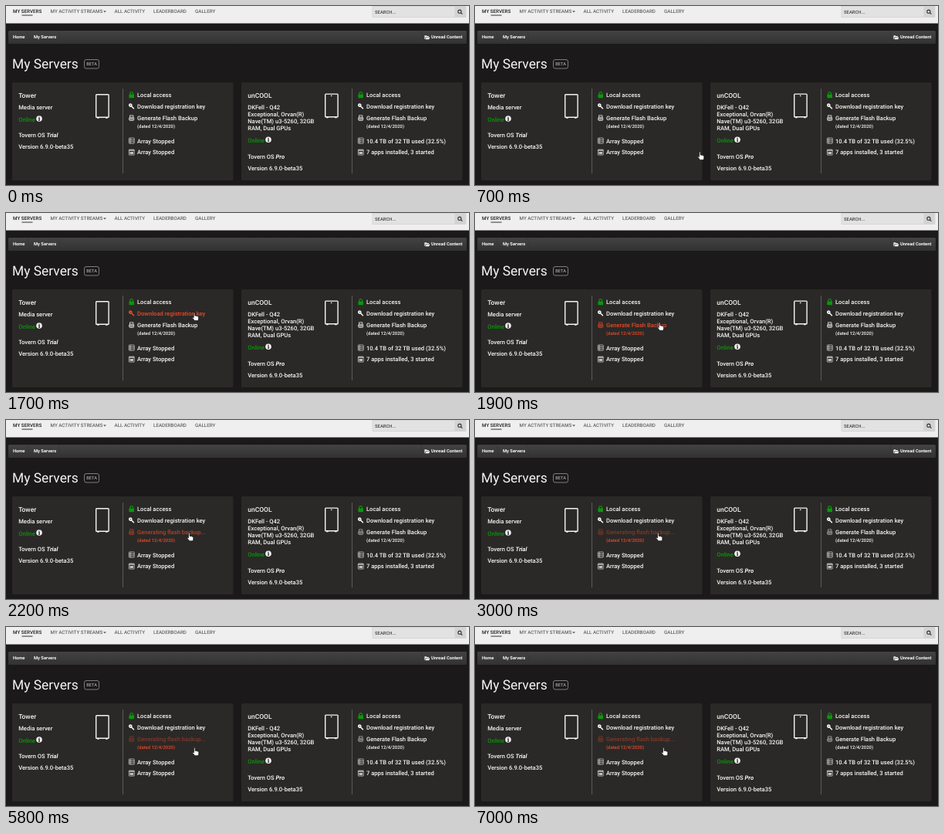
Animation of 600 by 232 pixels, one loop 8 s. Source, as an HTML page:

```html
<!DOCTYPE html>
<html lang="en">
<head>
<meta charset="utf-8">
<title>My Servers</title>
<style>
  html, body { margin: 0; width: 100%; height: 100%; overflow: hidden; background: #1b191a; }
  svg { display: block; width: 600px; height: 232px; }
  text { font-family: Roboto, "Open Sans", sans-serif; font-size: 7.6px; font-weight: 500; fill: #f6f6f6; text-rendering: geometricPrecision; white-space: pre; }
  .nav { font-size: 6.25px; fill: #626262; }
  .nav.on { fill: #1c1c1c; }
  .nav.find { fill: #444; font-size: 5.9px; }
  .crumb { font-size: 5.75px; font-weight: 700; }
  .title { font-size: 17.4px; font-weight: 400; }
  .beta { font-size: 5.7px; fill: #c4c4c4; font-weight: 400; }
  .name { font-size: 8.5px; }
  .small { font-size: 5.95px; }
  .online { fill: #0b960b; }
  .em { font-weight: 700; font-style: italic; }
</style>
</head>
<body>
<svg viewBox="0 0 600 232">
  <defs>
    <linearGradient id="bar" x2="0" y2="1">
      <stop offset="0" stop-color="#434343"/><stop offset="1" stop-color="#323232"/>
    </linearGradient>
    <g id="lock">
      <path d="M-1.9 0V-1.6a1.9 1.9 0 0 1 3.8 0V0" fill="none" stroke="#0b960b" stroke-width="1.2"/>
      <rect x="-3.3" y="-.6" width="6.6" height="4.6" rx=".6" fill="#0b960b"/>
    </g>
    <g id="key" fill="none" stroke="currentColor">
      <circle cx="-1.4" cy="-1.4" r="1.5" stroke-width="1.7"/>
      <path d="M-.3-.3 3.2 3.2M1.4 2.2 2.4 1.2" stroke-width="1.4"/>
    </g>
    <g id="flash" fill="none" stroke="currentColor" stroke-width=".9" opacity=".85">
      <path d="M-2.2-.6V-3.2H2.2V-.6"/>
      <rect x="-3" y="-.8" width="6" height="4.2" rx="1" fill="currentColor" fill-opacity=".35"/>
      <path d="M-3 1.1H3"/>
    </g>
    <g id="disks" fill="none" stroke="#c9c9c9" stroke-width=".8">
      <rect x="-3.3" y="-3.4" width="6.8" height="7" rx=".4"/>
      <path d="M-3.3-1H3.5M-3.3 1.3H3.5M-1.4-3.4V3.6"/>
    </g>
    <g id="apps" fill="none" stroke="#c9c9c9" stroke-width=".8">
      <rect x="-3.3" y="-3.4" width="6.8" height="7" rx=".4"/>
      <path d="M-3.3-2.4H3.5" stroke-width="1.4"/>
      <rect x="-1.8" y="0" width="3.8" height="2" fill="#c9c9c9"/>
    </g>
    <g id="info">
      <circle r="3.8" fill="#f4f4f4"/>
      <path d="M0-2.4V-1.2M-.9-.4H.2V2M-1 2.1H1.1" stroke="#2a2927" stroke-width="1.1" fill="none"/>
    </g>
    <g id="tower" fill="none" stroke="#f4f4f4" stroke-width="1.4">
      <rect x=".7" y=".7" width="16.4" height="29.6" rx=".8"/>
      <path d="M2.2 31.2H4.6M13.200 31.2H15.600" stroke-width="1.2"/>
    </g>
  </defs>

  <rect width="600" height="232" fill="#1b191a"/>
  <rect width="600" height="22.5" fill="#f0efef"/>
  <rect x="20.5" y="11.5" width="14" height="1" fill="#333"/>
  <path d="M126 6.2H130L128 8.500Z" fill="#626262"/>
  <rect x="475" y=".5" width="121" height="14" fill="#e2e2e2" stroke="#cfcfcf" stroke-width=".7"/>
  <rect x="581.5" y=".8" width="14.2" height="13.4" fill="#d3d3d3"/>
  <g fill="none" stroke="#333" stroke-width="1.1">
    <circle cx="587.9" cy="7.2" r="2.1"/><path d="M589.4 8.7 591.4 10.7"/>
  </g>
  <rect x="3" y="32" width="594" height="17" rx="1.5" fill="url(#bar)"/>
  <path d="M27 32.5 30 40.5 27 48.5M67.5 32.5 70.5 40.5 67.5 48.5M538.5 32.5V48.5" fill="none" stroke="#363636" stroke-width=".8"/>
  <path d="M542.4 43V38.2H544.8L545.6 39H548V40H544L542.8 43ZM543.3 43.2 544.5 40.6H549.4L548.2 43.2Z" fill="#f2f2f2"/>
  <rect x="101.5" y="69.5" width="19" height="11.5" rx="2.5" fill="none" stroke="#8a8a8a" stroke-width=".9"/>
  <g id="head"></g>
  <g id="cards"></g>
  <path id="hand" fill="#fff" stroke="#111" stroke-width=".7" stroke-linejoin="round"
    d="M-.8 .7Q0-.6 .8 .7V4.3Q1.7 3.5 2.4 4.5Q3.4 3.9 4 4.9Q5.3 4.6 5.5 5.9V7.8Q5.4 9.2 4.7 10.5H.3Q-.6 8.9-2.5 7Q-2.7 5.6-1.5 6.1L-.8 6.8Z"/>
</svg>
<script>
const LOOP = 8000, STEP = 100;
const WHITE = '#f6f6f6', HOT = '#e8492a';
const $ = id => document.getElementById(id);

const label = (x, y, s, cls = '', id = '') =>
  `<text x="${x}" y="${y}" class="${cls}"${id && ` id="${id}"`}>${s}</text>`;
const icon = (name, x, y, id = '') =>
  `<use href="#${name}" transform="translate(${x} ${y})" color="${WHITE}"${id && ` id="${id}"`}/>`;

$('head').innerHTML =
  label(9, 9.4, 'MY SERVERS', 'nav on') +
  label(57.5, 9.4, 'MY ACTIVITY STREAMS', 'nav') +
  label(140.5, 9.4, 'ALL ACTIVITY', 'nav') +
  label(191, 9.4, 'LEADERBOARD', 'nav') +
  label(245, 9.4, 'GALLERY', 'nav') +
  label(478, 9.5, 'SEARCH...', 'nav find') +
  label(9, 42.4, 'Home', 'crumb') +
  label(36, 42.4, 'My Servers', 'crumb') +
  label(551, 42.4, 'Unread Content', 'crumb') +
  label(8, 81.3, 'My Servers', 'title') +
  label(104.2, 77.4, 'BETA', 'beta');

function card(c) {
  const { x, k } = c, left = x + 8.2, line = x + 143.5, mid = line + 11.2, rows = line + 18.5;
  const act = (name, y, s) =>
    icon(name, mid, y - 3, `${name}Icon${k}`) + label(rows, y, s, '', `${name}${k}`);
  return `<rect x="${x}" y="99" width="286.5" height="127" rx="1.5" fill="#2a2927"/>
    <path d="M${line} 107V217" stroke="#5c5b59" stroke-width="1"/>` +
    label(left, 118.7, c.name, 'name') +
    c.spec.map((s, i) => label(left, 133.8 + i * 9.1, s)).join('') +
    label(left, c.online + 3, 'Online', 'online') + icon('info', left + 26.8, c.online - .8) +
    label(left, c.os, `Tovern OS <tspan class="em">${c.plan}</tspan>`) +
    label(left, c.os + 15, 'Version 6.9.0-beta35') +
    icon('tower', c.box, c.top) +
    icon('lock', mid, 115.2) + label(rows, 118, 'Local access') +
    act('key', 133, 'Download registration key') +
    act('flash', 148, 'Generate Flash Backup') +
    label(rows, 157.6, '(dated 12/4/2020)', 'small', `date${k}`) +
    icon('disks', mid, 174.5) + label(rows, 177.5, c.array) +
    icon('apps', mid, 189.5) + label(rows, 192.3, c.apps);
}

$('cards').innerHTML =
  card({
    k: 'A', x: 8, box: 116, top: 114, name: 'Tower', spec: ['Media server'],
    online: 146.8, os: 170, plan: 'Trial', array: 'Array Stopped', apps: 'Array Stopped'
  }) +
  card({
    k: 'B', x: 305, box: 413, top: 113.4, name: 'unCOOL',
    spec: ['DKFell - Q42', 'Exceptional, Orvan(R)', 'Nave(TM) u3-5260, 32GB', 'RAM, Dual GPUs'],
    online: 174, os: 197.5, plan: 'Pro',
    array: '10.4 TB of 32 TB used (32.5%)', apps: '7 apps installed, 3 started'
  }) +
  '<circle cx="421.7" cy="116.4" r=".8" fill="#f4f4f4"/>';

// [time, x, y] of the fingertip
const path = [
  [600, 300, 200], [1000, 244, 129], [1700, 244, 129],
  [2000, 237.3, 146.3], [4100, 237.3, 146.3], [4300, 244.3, 156.3]
];
// [time, brightness] of the running backup label
const fade = [[2100, 1], [2200, .74], [2300, .7], [2500, .46]];

function at(table, t) {
  const i = table.findIndex(p => p[0] > t);
  if (i < 0) return table[table.length - 1].slice(1);
  if (i === 0) return table[0].slice(1);
  const a = table[i - 1], b = table[i], u = (t - a[0]) / (b[0] - a[0]);
  const e = u * u * (3 - 2 * u);
  return a.slice(1).map((v, n) => v + (b[n + 1] - v) * e);
}

function paint(name, card, color, alpha = 1) {
  const text = $(name + card).style, mark = $(`${name}Icon${card}`).style;
  text.fill = mark.color = color;
  text.opacity = mark.opacity = alpha;
}

function draw(now) {
  const t = Math.floor(now % LOOP / STEP) * STEP;
  const [x, y] = at(path, t);
  $('hand').setAttribute('transform', `translate(${x} ${y})`);
  $('hand').style.display = t < 600 ? 'none' : '';

  const busy = t >= 2100, onFlash = t >= 1900;
  paint('key', 'A', t >= 1000 && !onFlash ? HOT : WHITE);
  paint('flash', 'A', onFlash ? HOT : WHITE, busy ? at(fade, t)[0] : 1);
  $('flashA').textContent = busy ? 'Generating flash backup...' : 'Generate Flash Backup';
  $('dateA').style.fill = onFlash ? HOT : WHITE;
  $('flashIconB').style.opacity = busy ? .65 : 1;
}

function tick() {
  draw(performance.now());
  requestAnimationFrame(tick);
}
tick();
</script>
</body>
</html>
```
